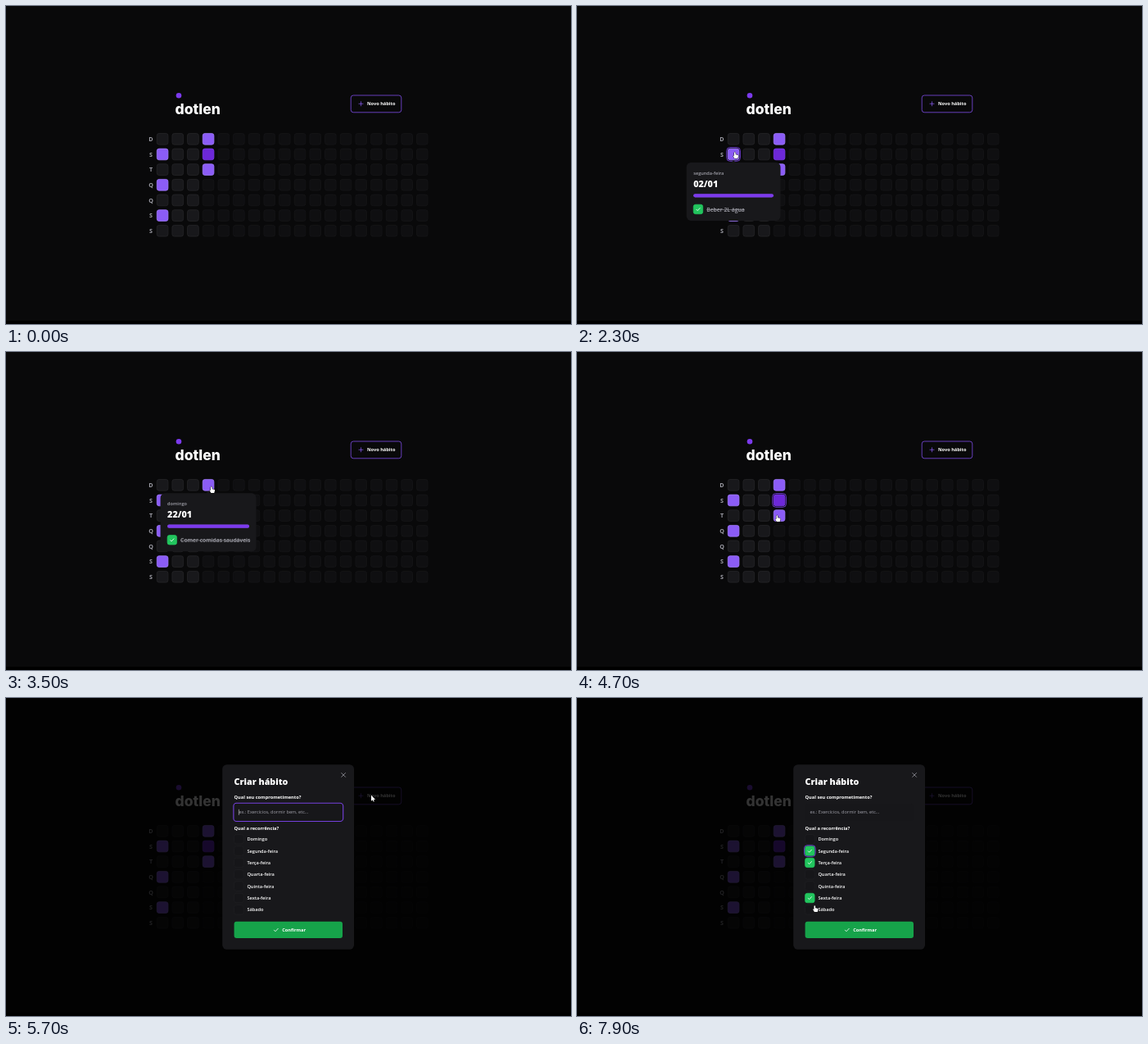
An HTML page with a canvas for the animation above (8 s loop, 690x388 px).

```html
<!DOCTYPE html>
<html lang="pt-BR">
<head>
<meta charset="utf-8">
<title>dotlen</title>
<style>
  html, body { margin: 0; width: 100%; height: 100%; overflow: hidden; background: #09090a; }
  canvas { display: block; width: 690px; height: 388px; }
</style>
</head>
<body>
<canvas id="stage" width="690" height="388"></canvas>
<script>
const ctx = document.getElementById('stage').getContext('2d');
const LOOP = 8000, STEP = 100;
const PITCH = 18.66, CELL = 14.4, ROW = 15.2;
const VIOLET = '#8b5cf6', RING = '#7440dc', PANEL = '#18181b', GRAY = '#a1a1aa';
const SANS = '"Open Sans", "Noto Sans", sans-serif';
const WEEK = ['Domingo', 'Segunda-feira', 'Terça-feira', 'Quarta-feira',
  'Quinta-feira', 'Sexta-feira', 'Sábado'];

const water = 'Beber 2L água', food = 'Comer comidas saudáveis';
const study = 'Estudar programação por 1 hora', gym = 'Fazer exercícios';
const popovers = [
  { open: 2000, close: 2400, col: 0, row: 1, date: '02/01', width: 114.8, tasks: [water], done: 1 },
  { open: 2600, close: 3100, col: 0, row: 3, date: '04/01', width: 114.8, tasks: [water, gym], done: 2 },
  { open: 3300, close: 3800, col: 3, row: 0, date: '22/01', width: 117, tasks: [food], done: 1 },
  { open: 4200, close: 4600, col: 3, row: 1, date: '23/01', width: 138,
    tasks: [water, food, study, gym, 'Dormir 8 horas'], done: 3 },
  { open: 5000, close: 5400, col: 3, row: 2, date: '24/01', width: 144,
    tasks: [water, food, study, gym, 'Dormir 8 horas', 'Ler um livro'], done: 6 }
];
const MODAL_OPEN = 5600;
const checks = [{ day: 2, at: 6400 }, { day: 5, at: 7100 }, { day: 1, at: 7600 }];

// time, x, y
const path = [
  [1900, 205, 200], [2000, 194, 182], [2300, 194, 182], [2600, 193, 219], [3000, 193, 219],
  [3300, 252, 168], [3800, 252, 168], [4000, 247, 185], [4500, 247, 185], [4700, 245.5, 203],
  [5300, 245.5, 203], [5500, 448, 122.5], [5700, 448, 122.5], [6100, 350, 165], [6300, 286, 202],
  [6500, 286, 202], [6800, 290, 275], [7000, 287, 245], [7100, 287, 245], [7400, 310, 158],
  [7600, 287, 187], [7700, 287, 190], [7900, 291.5, 257]
];
const hand = new Path2D('M-2-3.2q.8-1.3 1.6 0V-.8L2.4-.3Q3.2 0 3 1.2L2.2 4H-1.6L-3.4 1Q-3.2 0-2 .8Z');
const arrow = new Path2D('M-2-4V3.2L-.4 1.8.8 4 1.8 3.4.8 1.4H3Z');

function box(x, y, w, h, r, fill, stroke, line = 0.75) {
  ctx.beginPath();
  ctx.roundRect(x, y, w, h, r);
  if (fill) { ctx.fillStyle = fill; ctx.fill(); }
  if (stroke) { ctx.strokeStyle = stroke; ctx.lineWidth = line; ctx.stroke(); }
}

function text(str, x, y, size, weight, color, family = SANS) {
  ctx.font = `${weight} ${size}px ${family}`;
  ctx.fillStyle = color;
  ctx.fillText(str, x, y + size * 0.36);
  return ctx.measureText(str).width;
}

function lines(color, width, ...strokes) {
  ctx.beginPath();
  for (const [start, ...rest] of strokes) {
    ctx.moveTo(...start);
    rest.forEach(p => ctx.lineTo(...p));
  }
  ctx.strokeStyle = color;
  ctx.lineWidth = width;
  ctx.stroke();
}

function tick(x, y, s) {
  lines('#fff', 0.8, [[x - s, y], [x - s * 0.3, y + s * 0.7], [x + s, y - s * 0.7]]);
}

function checkbox(x, y, checked, focused) {
  const s = 11.5;
  box(x, y - s / 2, s, s, 2.6, checked ? '#22c55e' : '#161619', checked ? '#22c55e' : '#202023', 0.7);
  if (checked) tick(x + s / 2, y, 2.4);
  if (focused) box(x - 1, y - s / 2 - 1, s + 2, s + 2, 3.4, null, RING, 0.9);
}

const center = (col, row) => [191.1 + col * PITCH, 162.3 + row * PITCH];

function cell(col, row, focused) {
  const [x, y] = center(col, row), h = CELL / 2;
  const past = col < 3 || (col === 3 && row < 3);
  const full = (col === 0 && row % 2 && row < 6) || (col === 3 && row < 3 && row !== 1);
  const partial = col === 3 && row === 1;
  const fill = full ? VIOLET : partial ? '#6d28d9' : PANEL;
  const edge = full ? '#a07cf8' : partial ? '#7c3aed' : '#27272a';
  ctx.globalAlpha = past ? 1 : 0.4;
  box(x - h + 0.35, y - h + 0.35, CELL - 0.7, CELL - 0.7, 2.7, fill, edge);
  ctx.globalAlpha = 1;
  if (focused) box(x - h - 1.1, y - h - 1.1, CELL + 2.2, CELL + 2.2, 3.8, null, RING, 0.9);
}

function page(focus) {
  ctx.fillStyle = '#09090a';
  ctx.fillRect(0, 0, 690, 388);
  ctx.fillStyle = '#000';
  ctx.fillRect(0, 384, 690, 4);

  ctx.fillStyle = '#7c3aed';
  ctx.beginPath();
  ctx.arc(211, 109.3, 3.3, 0, Math.PI * 2);
  ctx.fill();
  text('dotlen', 206.6, 125.7, 17.5, 800, '#fff', 'Inter, sans-serif');

  box(421.2, 109, 61.6, 20.8, 3, null, '#7045cc', 0.9);
  lines(VIOLET, 0.7, [[430.6, 119.3], [436.4, 119.3]], [[433.5, 116.4], [433.5, 122.2]]);
  text('Novo hábito', 441, 119.3, 5.65, 700, '#fff');

  ctx.textAlign = 'center';
  WEEK.forEach((day, row) => text(day[0], 177, center(0, row)[1] + 0.2, 7.1, 700, GRAY));
  ctx.textAlign = 'left';
  for (let col = 0; col < 18; col++)
    for (let row = 0; row < 7; row++)
      cell(col, row, focus && focus.col === col && focus.row === row);
}

function popover({ col, row, date, width, tasks, done }) {
  const [cx, cy] = center(col, row);
  const top = cy + CELL / 2 + 2.8, left = cx - width / 2, x = left + 8.5, bar = width - 17;
  ctx.fillStyle = PANEL;
  ctx.beginPath();
  ctx.moveTo(cx - 2.9, top);
  ctx.lineTo(cx + 2.9, top);
  ctx.lineTo(cx, top - 2.8);
  ctx.fill();
  box(left, top, width, 71 + ROW * (tasks.length - 1), 5.6, PANEL);
  text(WEEK[row].toLowerCase(), x, top + 13, 5.6, 600, GRAY);
  text(date, x, top + 25.9, 10.8, 800, '#fff');
  box(x, top + 38.2, bar, 4.3, 2.1, '#3f3f46');
  box(x, top + 38.2, bar * done / tasks.length, 4.3, 2.1, '#7c3aed');
  tasks.forEach((task, i) => {
    const y = top + 57 + i * ROW;
    checkbox(x, y, i < done);
    const w = text(task, x + 16, y + 0.2, 6.8, 600, i < done ? GRAY : '#fff');
    if (i < done) lines(GRAY, 0.6, [[x + 16, y + 0.6], [x + 16 + w, y + 0.6]]);
  });
}

function modal(t) {
  ctx.fillStyle = 'rgba(0,0,0,.8)';
  ctx.fillRect(0, 0, 690, 388);
  box(264.2, 81.2, 160.8, 225.6, 5.6, PANEL);
  lines(GRAY, 0.75, [[409.4, 91.2], [414.8, 96.6]], [[414.8, 91.2], [409.4, 96.6]]);
  text('Criar hábito', 278.6, 102, 10.7, 800, '#fff');
  text('Qual seu comprometimento?', 278.6, 121, 5.65, 700, '#fff');

  const typing = t < checks[0].at;
  box(278.6, 129, 132.4, 20.8, 3, '#17171a');
  if (typing) box(277.9, 128.3, 133.8, 22.2, 3.6, null, RING, 1.1);
  text('ex.: Exercícios, dormir bem, etc...', 284.4, 139.2, 5.6, 400, GRAY);
  if (typing && (t - MODAL_OPEN) % 1000 < 500) lines('#fff', 0.5, [[284.4, 135.8], [284.4, 142.8]]);

  text('Qual a recorrência?', 278.6, 158.5, 5.65, 700, '#fff');
  const active = checks.filter(c => t >= c.at);
  const last = active[active.length - 1];
  WEEK.forEach((day, i) => {
    const y = 172.2 + i * 14.36;
    checkbox(278.6, y, active.some(c => c.day === i), last && last.day === i);
    text(day, 294.4, y, 5.65, 600, '#fff');
  });

  box(278.6, 272.7, 132.4, 20.4, 3, '#16a34a');
  tick(329.8, 282.9, 2.7);
  text('Confirmar', 337.2, 282.9, 5.65, 700, '#fff');
}

function cursor(t) {
  if (t < path[0][0]) return;
  const i = path.findIndex(p => p[0] > t);
  let [, x, y] = path[path.length - 1];
  if (i > 0) {
    const [t0, x0, y0] = path[i - 1], [t1, x1, y1] = path[i];
    const k = (t - t0) / (t1 - t0), e = k * k * (3 - 2 * k);
    x = x0 + (x1 - x0) * e;
    y = y0 + (y1 - y0) * e;
  }
  const shape = t >= MODAL_OPEN && t < 6200 ? arrow : hand;
  ctx.save();
  ctx.translate(x, y);
  ctx.strokeStyle = '#111';
  ctx.lineWidth = 0.9;
  ctx.stroke(shape);
  ctx.fillStyle = '#fff';
  ctx.fill(shape);
  ctx.restore();
}

function draw(now) {
  const t = Math.floor((now % LOOP) / STEP) * STEP;
  const current = popovers.filter(p => t >= p.open).pop();
  // Focus returns to the cell as its popover closes.
  page(current && t >= current.close - STEP && t < MODAL_OPEN ? current : null);
  if (current && t < current.close) popover(current);
  if (t >= MODAL_OPEN) modal(t);
  cursor(t);
}

const start = performance.now();
function frame() {
  draw(performance.now() - start);
  requestAnimationFrame(frame);
}
frame();
</script>
</body>
</html>
```
